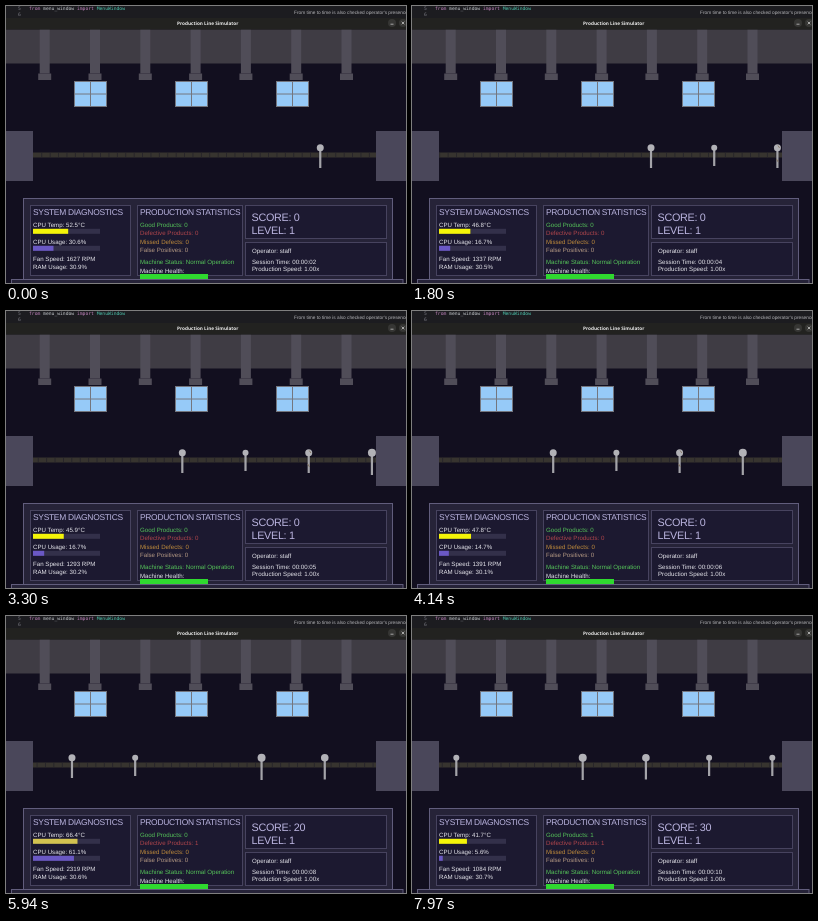
An HTML page with a canvas for the animation above (8000 ms loop, 400 by 277 pixels).

```html
<!DOCTYPE html>
<html lang="en">
<head>
<meta charset="utf-8">
<title>Production Line Simulator</title>
<style>
  html, body { margin: 0; width: 100%; height: 100%; overflow: hidden; background: #120f1f; }
  canvas { display: block; width: 400px; height: 277px; }
</style>
</head>
<body>
<canvas id="stage"></canvas>
<script>
const W = 400, H = 277, LOOP = 8000;
const SANS = '"Liberation Sans", Arial, sans-serif';
const MONO = '"DejaVu Sans Mono", monospace';
const TITLE = '#bbb5e0';
const canvas = document.getElementById('stage');
const ctx = canvas.getContext('2d');
const dpr = window.devicePixelRatio || 1;
canvas.width = W * dpr;
canvas.height = H * dpr;
ctx.scale(dpr, dpr);
ctx.textRendering = 'geometricPrecision';

const SPEED = 41.8, GAP = 63.2, FIRST_X = 314.3;  // px/s, px, px
const REJECT_AT = 5, DELIVER_AT = 7.5;            // seconds
const SESSION_START = 2.45;

// Head radius and stem end of each product, in order of arrival.
const products = [
  { r: 3.5, end: 162 }, { r: 3, end: 160 },
  { r: 3.5, end: 162, defect: true },
  { r: 4, end: 164 }, { r: 3.8, end: 163.5 },
  { r: 3, end: 160 }, { r: 3, end: 160 }, { r: 3.5, end: 162 }
];

// One reading per session second: temperature, CPU load, fan speed, RAM load.
const readings = [
  [52.5, 30.6, 1627, 30.9], [48.6, 20.4, 1432, 30.7], [46.8, 16.7, 1337, 30.5],
  [45.9, 16.7, 1293, 30.2], [47.8, 14.7, 1391, 30.1], [54.2, 32.5, 1711, 30.3],
  [66.4, 61.1, 2319, 30.6], [43.4, 10.8, 1168, 30.0], [41.7, 5.6, 1084, 30.7]
];

function rect(x, y, w, h, color) {
  ctx.fillStyle = color;
  ctx.fillRect(x, y, w, h);
}

function frame(x, y, w, h, fill, stroke, line = 1) {
  rect(x, y, w, h, fill);
  ctx.strokeStyle = stroke;
  ctx.lineWidth = line;
  ctx.strokeRect(x, y, w, h);
}

function disc(x, y, r, color) {
  ctx.fillStyle = color;
  ctx.beginPath();
  ctx.arc(x, y, r, 0, Math.PI * 2);
  ctx.fill();
}

function text(str, x, y, color = '#e6e6ec', size = 6.15, family = SANS, weight = '') {
  ctx.font = `${weight} ${size}px ${family}`;
  ctx.fillStyle = color;
  ctx.fillText(str, x, y);
}

function heading(str, x, y, size) {
  ctx.letterSpacing = '-0.3px';
  text(str, x, y, TITLE, size);
  ctx.letterSpacing = '0px';
}

function line(x1, y1, x2, y2, color, width) {
  ctx.strokeStyle = color;
  ctx.lineWidth = width;
  ctx.beginPath();
  ctx.moveTo(x1, y1);
  ctx.lineTo(x2, y2);
  ctx.stroke();
}

function drawDesktop() {
  rect(0, 0, W, 12, '#1c1c20');
  text('5', 12, 3.6, '#77777f', 4.7, MONO);
  text('6', 12, 10.4, '#77777f', 4.7, MONO);
  let x = 23;
  for (const [word, color] of [['from ', '#c586c0'], ['menu_window ', '#c8ccd0'],
                               ['import ', '#c586c0'], ['MenuWindow', '#4ec9b0']]) {
    text(word, x, 3.6, color, 4.7, MONO);
    x += ctx.measureText(word).width;
  }
  text("From time to time is also checked operator's presence", 288, 7.8, '#b4b4b8', 4.75);

  rect(0, 12, W, 11.5, '#222220');
  ctx.textAlign = 'center';
  text('Production Line Simulator', 201.7, 18.8, '#ededed', 4.7, '"Open Sans", sans-serif', 'bold');
  ctx.textAlign = 'left';
  disc(386, 17, 4, '#363634');
  disc(397, 17, 4, '#363634');
  line(384.5, 18.2, 387.5, 18.2, '#d8d8d8', 0.7);
  line(395.7, 15.7, 398.3, 18.3, '#d8d8d8', 0.7);
  line(398.3, 15.7, 395.7, 18.3, '#d8d8d8', 0.7);
}

function drawFactory() {
  rect(0, 23.5, W, H, '#120f1f');
  rect(0, 23.5, W, 34, '#3f3c44');
  for (let i = 0; i < 7; i++) {
    const x = 33.7 + i * 50.3;
    rect(x, 23.5, 10, 44, '#504d58');
    rect(x - 1.5, 67.5, 13, 6.5, '#504d58');
  }
  for (let i = 0; i < 3; i++) {
    const x = 68.5 + i * 101;
    frame(x, 75.5, 32, 25, '#96caf8', '#74767e');
    line(x + 16, 75.5, x + 16, 100.5, '#74767e', 1);
    line(x, 88, x + 32, 88, '#74767e', 1);
  }
}

function drawBelt(t) {
  rect(27, 146.5, 343, 5, '#37342f');
  const shift = (t * SPEED) % 8.4;
  for (let x = 35.4 - shift; x < 370; x += 8.4) rect(x, 146.5, 0.8, 5, '#25232a');
}

function drawProducts(t) {
  products.forEach(({ r, end, defect }, i) => {
    const x = FIRST_X + i * GAP - t * SPEED;
    if (x < -5 || x > 390 || (defect && t >= REJECT_AT)) return;
    rect(x - 1.1, 142, 2.2, end - 142, '#a4a4a9');
    disc(x, 141.7, r, '#b2b2b7');
    if (defect) {
      line(x + 0.5, 139.5, x + 2.2, 142, '#80705c', 0.8);
      line(x - 1, 153, x + 0.8, 156, '#80705c', 0.9);
    }
  });
  rect(0, 125, 27, 50, '#4a475a');
  rect(370, 125, 30, 50, '#4a475a');
}

function meter(y, percent, color) {
  rect(27, y, 67, 5, '#33304a');
  rect(27, y, 67 * percent / 100, 5, color);
}

function drawPanel(t) {
  const seconds = Math.floor(SESSION_START + t);
  const [temp, cpu, fan, ram] = readings[seconds - 2];
  const rejected = t >= REJECT_AT ? 1 : 0;
  const delivered = t >= DELIVER_AT ? 1 : 0;
  const edge = '#47435f', inner = '#1c1930', body = '#262338', rim = '#615d7c';

  frame(17.5, 192.5, 369, 82, body, rim);
  frame(5.5, 273.5, 391.5, 8, body, rim);
  frame(24.5, 199.5, 100, 70, inner, edge);
  frame(131.5, 199.5, 105, 70, inner, edge);
  frame(239.5, 199.5, 141, 33, inner, edge);
  frame(239.5, 236.5, 141, 33, inner, edge);

  heading('SYSTEM DIAGNOSTICS', 27, 209.2, 8.45);
  text(`CPU Temp: ${temp.toFixed(1)}°C`, 27, 220.5);
  meter(222.8, temp, temp > 60 ? '#d2c250' : '#f4f408');
  text(`CPU Usage: ${cpu.toFixed(1)}%`, 27, 238.2);
  meter(239.8, cpu, '#6a58c4');
  text(`Fan Speed: ${fan} RPM`, 27, 254.9);
  text(`RAM Usage: ${ram.toFixed(1)}%`, 27, 263.2);

  heading('PRODUCTION STATISTICS', 134, 209.2, 8.45);
  text(`Good Products: ${delivered}`, 134, 220.8, '#56c65a');
  text(`Defective Products: ${rejected}`, 134, 229.3, '#b0464c');
  text('Missed Defects: 0', 134, 237.7, '#c08c3c');
  text('False Positives: 0', 134, 246, '#b59a84');
  text('Machine Status: Normal Operation', 134, 258.3, '#56c65a');
  text('Machine Health:', 134, 266.7);
  rect(134, 268, 68, 5, '#2fd92f');

  heading(`SCORE: ${rejected * 20 + delivered * 10}`, 245.5, 214.7, 10.8);
  heading('LEVEL: 1', 245.5, 227.8, 10.8);
  text('Operator: staff', 246, 247.3);
  text(`Session Time: 00:00:${String(seconds).padStart(2, '0')}`, 246, 258.2);
  text('Production Speed: 1.00x', 246, 264.5);
}

function draw(now) {
  const t = (now % LOOP) / 1000;
  drawFactory();
  drawBelt(t);
  drawProducts(t);
  drawPanel(t);
  drawDesktop();
}

const start = performance.now();
function tick() {
  draw(performance.now() - start);
  requestAnimationFrame(tick);
}
tick();
</script>
</body>
</html>
```
